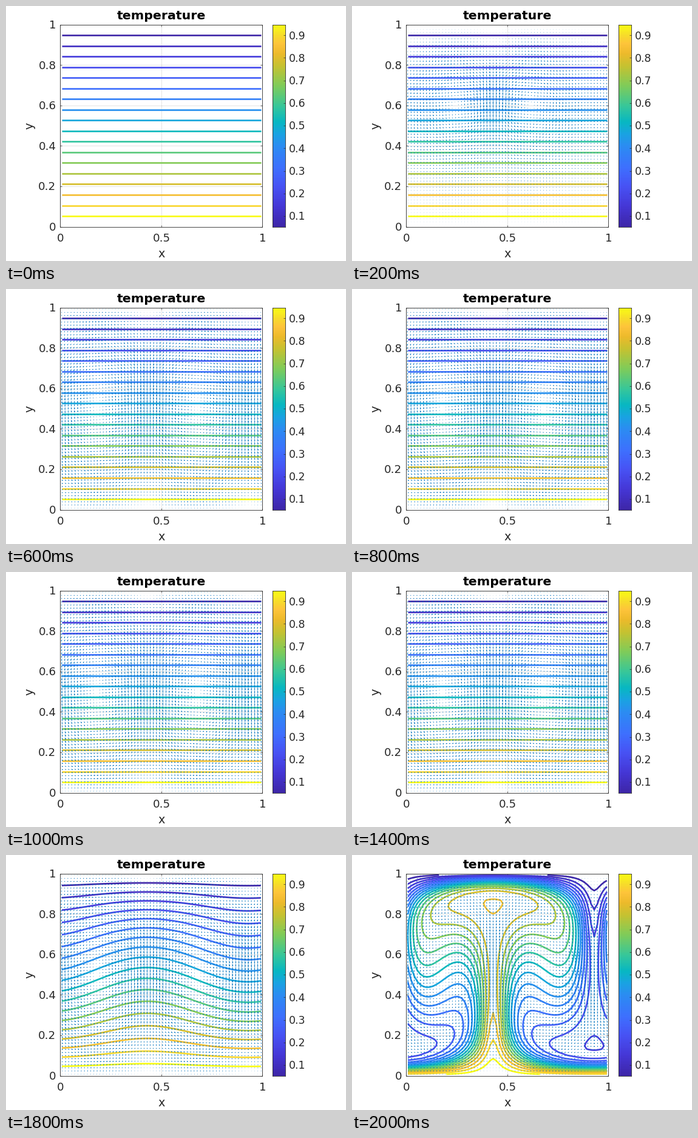
A matplotlib script that plays this animation: 560 by 420 pixels, repeating every 2.1 s.

```python
import numpy as np
import matplotlib.pyplot as plt
from matplotlib.animation import FuncAnimation
from matplotlib.collections import LineCollection
from matplotlib.colors import LinearSegmentedColormap

W, H, DPI = 560, 420, 100
FRAMES, INTERVAL = 21, 100
N = 64
h = 1 / N
RA, PR, DT = 2.2e5, 1.0, 0.008
PLUME = 27.5 * h
INK = "#262626"

nu, kappa = np.sqrt(PR / RA), 1 / np.sqrt(RA * PR)
x = (np.arange(N) + 0.5) * h
y = np.arange(N + 1)[:, None] * h
X, Y = np.meshgrid(x, x)

# Poisson solver: sine transform in y, Fourier in x
j = np.arange(1, N)
S = np.sin(np.pi * np.outer(j, j) * h) * np.sqrt(2 * h)
lam = 4 / h**2 * (np.sin(np.pi * j[:, None] * h / 2) ** 2
                  + np.sin(np.pi * np.arange(N // 2 + 1) * h) ** 2)


def stream(w):
    psi = np.zeros_like(w)
    hat = np.fft.rfft(S @ w[1:-1], axis=1) / lam
    psi[1:-1] = S @ np.fft.irfft(hat, n=N, axis=1)
    return psi


def ddx(f):
    return (np.roll(f, -1, 1) - np.roll(f, 1, 1)) / (2 * h)


def ddy(f):
    return (f[2:] - f[:-2]) / (2 * h)


def transport(f, u, v, diff):
    """Advection and diffusion on the interior rows."""
    m = f[1:-1]
    east, west = np.roll(m, -1, 1), np.roll(m, 1, 1)
    lap = (east + west + f[2:] + f[:-2] - 4 * m) / h**2
    return diff * lap - u * (east - west) / (2 * h) - v * ddy(f)


def rates(w, T):
    psi = stream(w)
    w[0], w[-1] = -2 * psi[1] / h**2, -2 * psi[-2] / h**2
    u, v = ddy(psi), -ddx(psi[1:-1])
    dw, dT = np.zeros_like(w), np.zeros_like(T)
    dw[1:-1] = transport(w, u, v, nu) + ddx(T[1:-1])
    dT[1:-1] = transport(T, u, v, kappa)
    return dw, dT


def convect():
    """Heat a layer from below until the warm lobes sink beside the plume."""
    T = 1 - y + 5e-4 * np.cos(2 * np.pi * (x - PLUME)) * np.sin(np.pi * y)
    w = np.zeros_like(T)
    states, onset, last = [], None, 0
    for step in range(6000):
        if step % 10 == 0:
            states.append((T.copy(), stream(w)))
            if onset is None and np.ptp(T[N // 2]) / 2 >= 0.058:
                onset = len(states) - 1
            lobe = T[45, 5]
            if lobe > 0.675 or 0.5 < lobe < last:
                break
            last = lobe
        a, b = rates(w, T)
        a, b = rates(w + DT / 2 * a, T + DT / 2 * b)
        w, T = w + DT * a, T + DT * b
    return states, onset


states, onset = convect()
gap = (len(states) - 1 - onset) / 2
calm = int(onset * 0.3)

a = 2 * np.pi * (x - PLUME)
startup = -(np.sin(a) + 0.3 * np.sin(2 * a)) * np.sin(np.pi * y**1.36) ** 3
startup /= np.abs(startup).max()


def fields(k):
    i = int(round(onset + (k - 18) * gap))
    T, psi = states[max(i, calm)]
    if i < calm:
        T = 1 - y + 0 * x
    psi = psi / np.abs(psi).max() + 8 * 0.3 ** (k - 2) * startup
    return (T[1:] + T[:-1]) / 2, psi


def arrows(psi):
    u = (psi[1:] - psi[:-1]) / h
    v = -ddx((psi[1:] + psi[:-1]) / 2)
    s = 0.9 * h / np.hypot(u, v).max()
    u, v = u * s, v * s
    tx, ty = X + u, Y + v
    px = [X, tx, tx - 0.33 * (u + 0.33 * v), tx, tx - 0.33 * (u - 0.33 * v)]
    py = [Y, ty, ty - 0.33 * (v - 0.33 * u), ty, ty - 0.33 * (v + 0.33 * u)]
    return np.stack([px, py], -1).transpose(1, 2, 0, 3).reshape(-1, 5, 2)


parula = LinearSegmentedColormap.from_list("parula", [
    (0.00, (0.242, 0.150, 0.660)), (0.10, (0.271, 0.215, 0.840)),
    (0.20, (0.281, 0.323, 0.958)), (0.29, (0.244, 0.436, 0.999)),
    (0.40, (0.171, 0.550, 0.950)), (0.46, (0.100, 0.640, 0.885)),
    (0.52, (0.030, 0.720, 0.760)), (0.60, (0.220, 0.780, 0.600)),
    (0.70, (0.500, 0.800, 0.350)), (0.80, (0.780, 0.760, 0.190)),
    (0.86, (0.930, 0.730, 0.170)), (0.91, (0.997, 0.770, 0.230)),
    (0.95, (0.970, 0.860, 0.170)), (1.00, (0.977, 0.984, 0.081))])
levels = np.arange(1, 19) / 19
LO, HI = levels[0], levels[-1]

plt.rcParams["font.family"] = "DejaVu Sans"
fig = plt.figure(figsize=(W / 100, H / 100), dpi=DPI, facecolor="white")


def panel(left, top, right, bottom):
    p = fig.add_axes([left / W, 1 - bottom / H,
                      (right - left) / W, (bottom - top) / H])
    for spine in p.spines.values():
        spine.set(color=INK, linewidth=0.6)
    p.tick_params(direction="in", length=2.4, width=0.5, color=INK,
                  labelbottom=False, labelleft=False)
    return p


def put(px, py, s, size, color=INK, **kw):
    fig.text(px / W, 1 - py / H, s, fontsize=size * 72 / DPI, color=color,
             va="baseline", **kw)


ax = panel(89.4, 30.6, 422.4, 363.6)
ax.set(xlim=(0, 1), ylim=(0, 1), xticks=[0, 0.5, 1],
       yticks=np.linspace(0, 1, 6))
ax.tick_params(top=True, right=True)
ax.grid(color=INK, alpha=0.15, linewidth=0.6)
ax.set_axisbelow(True)

cax = panel(439.4, 30.6, 460.4, 363.6)
cax.imshow(np.linspace(0, 1, 256)[:, None], cmap=parula, origin="lower",
           extent=(0, 1, LO, HI), aspect="auto")
cax.set(xticks=[], yticks=np.arange(1, 10) / 10, ylim=(LO, HI))
cax.tick_params(left=False, right=True)

for t in (0, 0.5, 1):
    put(89.5 + 333 * t, 388, f"{t:g}", 18.3, ha="center")
for t in np.arange(6) / 5:
    put(82.5, 370 - 333 * t, f"{t:g}", 18.3, ha="right")
for t in np.arange(1, 10) / 10:
    put(465.5, 370 - 333 * (t - LO) / (HI - LO), f"{t:g}", 17.4)
put(256, 22, "temperature", 20.5, "black", ha="center", weight="bold")
put(256, 414, "x", 19.3, ha="center")
put(44, 197, "y", 19.3, ha="center", rotation=90, rotation_mode="anchor")

flow = LineCollection([], colors=[(0, 0.447, 0.741)], linewidths=0.5,
                      joinstyle="bevel", capstyle="butt", zorder=4)
flow.set_snap(False)
ax.add_collection(flow, autolim=False)
isotherms = []


def draw(k):
    T, psi = fields(k)
    while isotherms:
        isotherms.pop().remove()
    isotherms.append(ax.contour(X, Y, T, levels=levels, cmap=parula, vmin=LO,
                                vmax=HI, linewidths=1.92, zorder=3))
    flow.set_segments(arrows(psi) if k else [])
    return []


anim = FuncAnimation(fig, draw, frames=FRAMES, interval=INTERVAL,
                     init_func=lambda: draw(0), repeat=True, repeat_delay=0)
plt.show()
```
